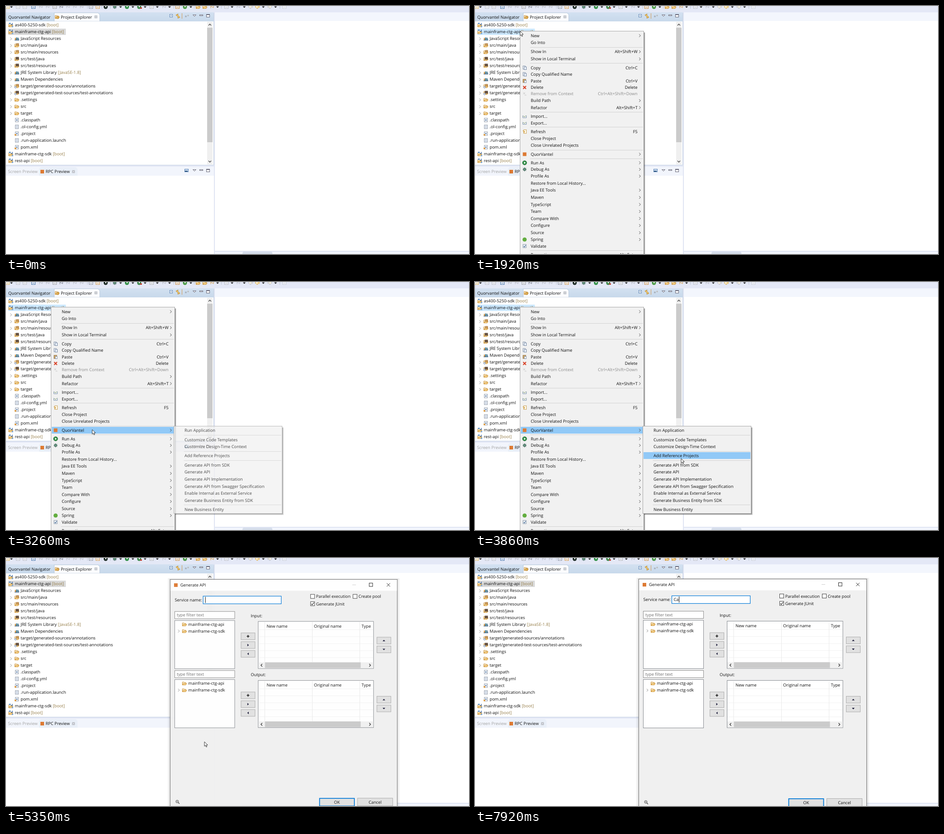
An HTML page with a canvas that plays this animation: 1022x548 px, repeating every 8 s.

```html
<!DOCTYPE html>
<html lang="en">
<head>
<meta charset="utf-8">
<title>Generate API</title>
<style>
html, body { margin: 0; width: 100%; height: 100%; overflow: hidden; background: #fff; }
canvas { display: block; }
</style>
</head>
<body>
<canvas id="stage" width="1022" height="548"></canvas>
<script>
const ctx = document.getElementById('stage').getContext('2d');
const LOOP = 8000;
const FONT = '9.3px "Open Sans", "Noto Sans", sans-serif';
const BLUE = '#0078d7', HILITE = '#91c9f7', ORANGE = '#dd7a33';

// ---- primitives ----
function rect(x, y, w, h, fill, stroke, lw = 1) {
  if (fill) { ctx.fillStyle = fill; ctx.fillRect(x, y, w, h); }
  if (stroke) { ctx.strokeStyle = stroke; ctx.lineWidth = lw; ctx.strokeRect(x, y, w, h); }
}
function poly(pts, fill, stroke, lw = 1, close = true) {
  ctx.beginPath();
  for (let i = 0; i < pts.length; i += 2) ctx.lineTo(pts[i], pts[i + 1]);
  if (close) ctx.closePath();
  if (fill) { ctx.fillStyle = fill; ctx.fill(); }
  if (stroke) { ctx.strokeStyle = stroke; ctx.lineWidth = lw; ctx.stroke(); }
}
const line = (pts, color, lw = 1) => poly(pts, null, color, lw, false);
function disc(x, y, r, fill, stroke, lw = 1) {
  ctx.beginPath();
  ctx.arc(x, y, r, 0, 7);
  if (fill) { ctx.fillStyle = fill; ctx.fill(); }
  if (stroke) { ctx.strokeStyle = stroke; ctx.lineWidth = lw; ctx.stroke(); }
}
function text(s, x, y, color = '#111', align = 'left') {
  ctx.fillStyle = color;
  ctx.textAlign = align;
  ctx.fillText(s, x, y + 3.1);
}
function chevron(x, y, dx, dy, color = '#555', lw = 1) {
  const s = 3;
  if (dx) line([x - dx * 1.5, y - s, x + dx * 1.5, y, x - dx * 1.5, y + s], color, lw);
  else line([x - s, y - dy * 1.5, x, y + dy * 1.5, x + s, y - dy * 1.5], color, lw);
}
const cross = (x, y, r, color, lw) => {
  line([x - r, y - r, x + r, y + r], color, lw);
  line([x - r, y + r, x + r, y - r], color, lw);
};
const caret = (x, y, color = '#111') => poly([x - 3, y, x + 3, y, x, y + 3], color);

// ---- icons, centred on x, y ----
const icon = {
  folder(x, y) {
    poly([x - 4.5, y + 3.5, x - 4.5, y - 3, x - 1, y - 3, x, y - 2, x + 3, y - 2, x + 3, y], '#fdf0cf', '#c98f35');
    poly([x - 4.5, y + 3.5, x - 2.5, y, x + 5, y, x + 3, y + 3.5], '#f8d58c', '#c98f35');
  },
  pkg(x, y) {
    icon.folder(x, y);
    rect(x - 1, y - 4, 5, 4, '#d9a763', '#8c5a25', .8);
  },
  test(x, y) {
    icon.folder(x, y);
    rect(x - 2, y - 4, 6, 5, '#6b5444', '#463528', .8);
  },
  gen(x, y) { icon.pkg(x, y); disc(x - 3, y + 2.5, 2, '#e8eef8', '#5877a8', .8); },
  genTest(x, y) { icon.test(x, y); disc(x - 3, y + 2.5, 2, '#e8eef8', '#5877a8', .8); },
  lib(x, y) {
    rect(x - 4.5, y - 1.5, 3, 5, '#d29a4c');
    rect(x - 1.5, y - 2.5, 2, 6, '#2f6f9f');
    rect(x + .8, y - 2, 1.6, 5.5, '#4f8a78');
    poly([x + 2.4, y - 2, x + 3.6, y - 2, x + 5.2, y + 3.5, x + 3.4, y + 3.5], '#3a6496');
    line([x - 5, y + 3.5, x + 5, y + 3.5], '#274d77');
  },
  boot(x, y) {
    icon.folder(x - .5, y + .5);
    line([x + 3, y - 4.5, x + 3, y - 1, x + .5, y - .5], '#2b62ad', 1.3);
    rect(x - 4.5, y - 5, 4, 3, '#6b9bd0');
    rect(x + 2, y + 2, 3, 3, '#7aa7d8');
  },
  file(x, y) {
    rect(x - 3.5, y - 4, 7, 8, '#fff', '#8c97a8');
    for (let i = -2; i < 4; i += 2) line([x - 2, y + i, x + 2, y + i], '#8aa0c0', .8);
  },
  xml(x, y) { rect(x - 3.5, y - 4, 7, 8, '#fff', '#8c97a8'); cross(x, y, 1.7, '#2d5b94', 1); },
  xmlTag(x, y) { icon.xml(x, y); rect(x - 5, y + 1, 3.5, 3.5, '#e09a3c'); },
  brand(x, y) { rect(x - 4, y - 4, 8, 8, ORANGE); },
  copy(x, y) {
    rect(x - 3.5, y - 4, 5, 7, '#fff', '#7b8ca5');
    rect(x - 1, y - 2, 5, 6, '#e9f0fa', '#7b8ca5');
  },
  paste(x, y) { rect(x - 3.5, y - 3.5, 6, 7, '#d5ad6b', '#8f6b35'); rect(x - .5, y - 1, 4, 5, '#fff', '#7b8ca5'); },
  del(x, y) { cross(x, y, 3.2, '#d9452b', 2.2); },
  remove(x, y) { cross(x - 1, y - 1, 2, '#c3c3c3', 1); line([x, y + 3, x + 4, y + 3], '#c3c3c3'); },
  port(x, y) { line([x - 4, y - 2, x - 4, y + 3, x + 4, y + 3, x + 4, y - 2], '#7b93ae'); line([x - 3, y - 1, x, y + 1, x + 3, y - 2], '#6f9160'); },
  refresh(x, y) { rect(x - 2, y - 4, 6, 8, '#fff8e8', '#c9a460'); line([x - 4, y - 2, x, y, x - 2, y + 3], '#d2992f', 1.3); },
  run(x, y) { disc(x, y, 4.6, '#2f8f45', '#1c6b30'); poly([x - 1.3, y - 2.4, x + 2.6, y, x - 1.3, y + 2.4], '#fff'); },
  bug(x, y) {
    cross(x, y, 3.3, '#31594e', 1);
    line([x - 4.5, y, x + 4.5, y], '#31594e');
    line([x, y - 4.5, x, y + 4.5], '#31594e');
    disc(x, y, 2.6, '#6f9f86', '#31594e');
  },
  spring(x, y) { disc(x, y, 4.6, '#62ad3f'); },
  check(x, y) { rect(x - 3.5, y - 3.5, 7, 7, '#fff', '#7c8ea4'); line([x - 2, y, x - .5, y + 2, x + 2.5, y - 2], '#2a5688', 1.2); }
};

// ---- workbench ----
const TREE = [
  ['as400-5250-sdk', 'boot', '[boot]'], ['mainframe-ctg-api', 'boot', '[boot]'],
  ['JavaScript Resources', 'lib'], ['src/main/java', 'pkg'], ['src/main/resources', 'pkg'],
  ['src/test/java', 'test'], ['src/test/resources', 'test'],
  ['JRE System Library', 'lib', '[JavaSE-1.8]'], ['Maven Dependencies', 'lib'],
  ['target/generated-sources/annotations', 'gen'],
  ['target/generated-test-sources/test-annotations', 'genTest'],
  ['.settings', 'folder'], ['src', 'folder'], ['target', 'folder'],
  ['.classpath', 'xml'], ['.ol-config.yml', 'file'], ['.project', 'xmlTag'],
  ['.run-application.launch', 'file'], ['pom.xml', 'xmlTag'],
  ['mainframe-ctg-sdk', 'boot', '[boot]'], ['rest-api', 'boot', '[boot]']
];
const GRAY = '#b9bcc6';
const TOOLS = {
  square: [[3, '#e3bc62'], [26, GRAY], [41, GRAY], [60, '#3c6ea8'], [107, '#9a9ca3'], [187, '#8a93a5'],
    [202, '#d59a4a'], [321, '#b0b2b8'], [378, '#c7893b'], [486, GRAY], [614, '#c9ced9']],
  disc: [[220, '#1d2b25'], [267, '#2f8f45'], [294, '#3f8a4d'], [395, '#4a9a45']],
  slash: [[77, GRAY], [92, GRAY], [122, '#777b86'], [137, GRAY], [152, GRAY], [167, GRAY], [349, GRAY], [455, '#d9a04a'], [513, GRAY]],
  arrow: [[540, GRAY, -1], [555, '#e0a92e', -1], [582, GRAY, 1]],
  caret: [12, 253, 280, 307, 334, 361, 408, 467, 499, 526, 568, 595],
  rule: [179, 211, 230, 370, 415, 475, 604]
};

function toolbar() {
  rect(0, 0, 1022, 14, '#e4e8f6');
  for (const [x, c] of TOOLS.square) { rect(x - 3.5, -4.5, 8, 10, '#f3f5fa', c); line([x - 2, 2.5, x + 3, 2.5], c); }
  for (const [x, c] of TOOLS.disc) { disc(x, 2, 4.5, c); rect(x - 1, 0, 2.5, 2.5, '#fff'); }
  for (const [x, c] of TOOLS.slash) line([x - 3, 5, x - 3, 0, x + 3, 4, x + 3, -1], c);
  for (const [x, c, d] of TOOLS.arrow) poly([x + 5 * d, 2, x, -2, x, .5, x - 4 * d, .5, x - 4 * d, 3.5, x, 3.5, x, 6], '#fff8e4', c);
  for (const x of TOOLS.caret) caret(x, 1);
  for (const x of TOOLS.rule) line([x + .5, 0, x + .5, 6], '#c3c8d6');
  icon.bug(240, 2);
  rect(296, 3, 4, 3, '#c0392b');
  icon.folder(424, 2);
  icon.folder(439, 2);
}

function viewButtons(y) {
  poly([412.5, y - 2.5, 419.5, y - 2.5, 416, y + 1], '#fff', '#667');
  rect(427.5, y - 2.5, 7, 2, '#fff', '#667');
  rect(442.5, y - 3.5, 7, 6, '#fff', '#667');
  line([442.5, y - 2.5, 449.5, y - 2.5], '#667');
}
function tabClose(x, y) {
  cross(x, y, 2.6, '#7c828e', 2.6);
  cross(x, y, 2.6, '#fff', 1.1);
}

function explorer(hot) {
  const g = ctx.createLinearGradient(0, 14, 0, 33);
  g.addColorStop(0, '#d3e1f1');
  g.addColorStop(1, '#c8d9eb');
  rect(0, 14, 459, 20, g);
  poly([106.5, 34, 106.5, 15, 203, 15, 207, 19, 207, 34], '#fbfcfe', '#b6c7da');
  rect(0, 34, 459, 317, '#fff');
  line([458.5, 16, 458.5, 351.5, 0, 351.5], '#c3d1e2');
  text('Quorvantel Navigator', 5, 24.5);
  icon.folder(113, 24);
  rect(112, 23, 4, 5, '#e9b65b', '#a97728', .8);
  text('Project Explorer', 121, 24.5);
  tabClose(198.5, 24);
  rect(361.5, 18.5, 6, 6, '#fff', '#5c83b5');
  line([363, 21.5, 366, 21.5], '#35608f');
  poly([375, 20, 380, 17.5, 379, 20, 384, 25, 379, 27, 380, 24], '#f3cf78', '#bd8424');
  line([388.5, 16, 388.5, 28], '#d39a55');
  disc(397, 23, 2, '#a9b3bf');
  disc(402, 21, 1.8, '#bbb');
  viewButtons(22);

  rect(5, 50, 127, 14, hot ? '#cce8ff' : '#d9d9d9');
  TREE.forEach(([label, kind, note], i) => {
    const y = 42 + 15 * i, root = kind === 'boot', x = root ? 19.5 : 32.3;
    icon[kind](root ? 11 : 24, y);
    if (!root && i < 14) chevron(11, y + .5, 1, 0, '#8a8a8a');
    text(label, x, y);
    if (note) text(note, x + ctx.measureText(label + ' ').width, y, '#957d47');
  });

  rect(444, 35, 12, 315, '#f0f0f0');
  rect(444, 48, 12, 253, '#cbcbcb');
  chevron(450, 41.5, 0, -1, '#444', 1.3);
  chevron(450, 343.5, 0, 1, '#444', 1.3);
}

function workbench(hot) {
  rect(0, 0, 1022, 548, '#fff');
  toolbar();
  explorer(hot);
  rect(0, 352, 460, 4, '#e4e8f6');
  rect(0, 355, 459, 20, '#f2f5fc');
  poly([73, 375, 73, 360, 77, 356, 154, 356, 158, 360, 158, 375], '#e9eff8');
  text('Screen Preview', 4.5, 366, '#a3a3a3');
  icon.brand(80, 366);
  text('RPC Preview', 87.5, 366);
  tabClose(149, 366);
  rect(394.5, 360.5, 8, 6, '#cfe0f2', '#5c83b5');
  rect(395, 364, 6, 2, '#33587f');
  viewButtons(364);

  rect(459, 14, 2, 534, '#dfe4f3');
  rect(461, 14, 561, 19, '#f3f6fd');
  rect(461, 541, 561, 2, '#dfe4f3');
  rect(461, 543, 561, 5, '#f3f6fd');
  poly([522, 548, 522, 545, 524, 543, 586, 543, 588, 545, 588, 548], '#d6deeb');
}

// ---- menus: [y, label, shortcut or '>', icon] ----
const MENU = [
  [65.5, 'New', '>'], [81, 'Go Into'], [101, 'Show In', 'Alt+Shift+W>'], [117, 'Show in Local Terminal', '>'],
  [136.5, 'Copy', 'Ctrl+C', 'copy'], [151, 'Copy Qualified Name', '', 'copy'], [165.5, 'Paste', 'Ctrl+V', 'paste'],
  [180, 'Delete', 'Delete', 'del'], [194, 'Remove from Context', 'Ctrl+Alt+Shift+Down', 'remove'],
  [209, 'Build Path', '>'], [224.5, 'Refactor', 'Alt+Shift+T>'], [244, 'Import...', '', 'port'],
  [258.5, 'Export...', '', 'port'], [277.5, 'Refresh', 'F5', 'refresh'], [292.5, 'Close Project'],
  [308, 'Close Unrelated Projects'], [327.5, 'QuorVantel', '>', 'brand'], [346.5, 'Run As', '>', 'run'],
  [361, 'Debug As', '>', 'bug'], [376, 'Profile As', '>'], [391.5, 'Restore from Local History...'],
  [407, 'Java EE Tools', '>'], [423, 'Maven', '>'], [438.5, 'TypeScript', '>'], [454, 'Team', '>'],
  [469.5, 'Compare With', '>'], [485, 'Configure', '>'], [501, 'Source', '>'], [516, 'Spring', '>', 'spring'],
  [530.5, 'Validate', '', 'check'], [550, 'Properties', 'Alt+Enter']
];
const MENU_RULES = [91, 126.5, 234.5, 267.5, 318, 337, 540];
const SUBMENU = [
  [328, 'Run Application'], [348.5, 'Customize Code Templates'], [364, 'Customize Design-Time Context'],
  [384, 'Add Reference Projects'], [404.4, 'Generate API from SDK'], [420, 'Generate API'],
  [435.5, 'Generate API Implementation'], [451.5, 'Generate API from Swagger Specification'],
  [467, 'Enable Internal as External Service'], [482.5, 'Generate Business Entity from SDK'],
  [503, 'New Business Entity']
];
const SUB_RULES = [338, 374, 394.5, 492.5];
const VENDOR_Y = 327.5;

// Only the visible right and bottom edges, so a fading menu stays clean.
function shadow(x, y, w, h) {
  [.45, .28, .12].forEach((a, i) => {
    const d = i + 1;
    line([x + w + d, y + 3, x + w + d, y + h + d, x + 3, y + h + d], `rgba(0,0,0,${a})`);
  });
}
const bar = (x, row, w) => rect(x, Math.round(row - 8), w, 15, HILITE);

function menu(x, y, w, h, items, rules, hot) {
  shadow(x, y, w, h);
  rect(x, y, w, h, '#f1f1f1', '#a6a6a6');
  for (const r of rules) line([x + 22, Math.floor(r) + .5, x + w - 2, Math.floor(r) + .5], '#d2d2d2');
  for (const [row, label, key = '', pic] of items) {
    if (row === hot) bar(x + 1.5, row, w - 3);
    const color = pic === 'remove' ? '#8b8b8b' : '#111';
    if (pic) icon[pic](x + 10, row);
    text(label, x + 23.4, row, color);
    text(key.replace('>', ''), x + 259.3, row, color, 'right');
    if (key.endsWith('>')) chevron(x + 264.3, row, 1, 0, '#444');
  }
}
function rowAt(items, y) {
  const row = items.find(([r]) => Math.abs(y + 1 - r) < 7.6);
  return row && row[0];
}

// ---- dialog ----
function checkbox(x, y, label, on) {
  rect(x - 4.5, y - 4.5, 9, 9, '#fff', '#444');
  if (on) line([x - 3, y, x - 1, y + 2.5, x + 3.2, y - 2.6], '#222', 1.2);
  text(label, x + 7.7, y + .4);
}
function button(x, y, w, h) { rect(x, y, w, h, '#e1e1e1', '#adadad'); }

function picker(dy, name, mouse) {
  const over = mouse.x > 371 && mouse.x < 505 && Math.abs(mouse.y - 125.5 - dy) < 8.5;
  rect(371.5, 117.5 + dy, 133, 16, '#fff', over ? '#222' : '#8a8a8a');
  text('type filter text', 376, 125.7 + dy, '#6d6d6d');
  rect(371.5, 137.5 + dy, 133, 107, '#fff', '#85898f');
  ['mainframe-ctg-api', 'mainframe-ctg-sdk'].forEach((s, i) => {
    const y = 146 + 15 * i + dy;
    icon.folder(393, y);
    text(s, 401.5, y);
    if (i) chevron(380.5, y, 1, 0, '#8a8a8a');
  });

  text(name, 540, 127 + dy);
  for (let i = 0; i < 3; i++) {
    const y = 172.5 + 19.5 * i + dy;
    button(518.5, y - 7.5, 31, 15);
    if (i === 0) { line([531, y, 537, y], '#111', 1.5); line([534, y - 3, 534, y + 3], '#111', 1.5); }
    else { const d = i === 1 ? 1 : -1; poly([534 - d * 1.5, y - 2.8, 534 + d * 1.8, y, 534 - d * 1.5, y + 2.8], '#1c1c3a'); }
  }
  for (const d of [-1, 1]) {
    const y = 191.8 + 9.8 * d + dy;
    button(819.5, y - 7.5, 31, 15);
    poly([832, y - d * 1.5, 838, y - d * 1.5, 835, y + d * 1.8], '#1c1c3a');
  }

  rect(556.5, 139.5 + dy, 255.5, 104.5, '#fff', '#85898f');
  for (let i = 0; i < 5; i++) line([557, 158 + 15.5 * i + dy, 811, 158 + 15.5 * i + dy], '#f1f1f1');
  for (const x of [571, 676.5, 781.5]) line([x, 141 + dy, x, 230 + dy], '#e9e9e9');
  text('New name', 575, 150 + dy);
  text('Original name', 680, 150 + dy);
  text('Type', 785.5, 150 + dy);
  rect(557, 230.3 + dy, 254.5, 13, '#f0f0f0');
  rect(571.5, 230.3 + dy, 212, 12.5, '#cbcbcb');
  chevron(564, 236.7 + dy, -1, 0, '#333', 1.3);
  chevron(804, 236.7 + dy, 1, 0, '#333', 1.3);
}

function dialog(typed, caretOn, mouse) {
  for (let i = 1; i < 7; i++) rect(361.5 - i, 47 - i / 2, 503 + 2 * i, 520, null, `rgba(0,0,0,${.13 - i * .02})`);
  rect(361.5, 46.5, 503, 510, '#f0f0f0', '#6f6f6f');
  rect(362, 47, 502, 24.5, '#fff');
  icon.brand(374, 59);
  text('Generate API', 384, 59);
  line([765, 58.5, 773, 58.5], '#ccc');
  rect(802.5, 54.5, 7.5, 7.5, null, '#222');
  cross(845, 58.5, 3.7, '#222', 1);

  text('Service name:', 371.5, 92);
  rect(434.5, 83.5, 173, 17, '#fff', BLUE, 1.2);
  text(typed, 438.5, 92);
  if (caretOn) rect(439 + ctx.measureText(typed).width, 85, 1, 13.5, '#000');
  checkbox(677, 84, 'Parallel execution');
  checkbox(771, 84, 'Create pool');
  checkbox(677, 100.3, 'Generate JUnit', true);
  picker(0, 'Input:', mouse);
  picker(131, 'Output:', mouse);

  disc(377, 539, 3, '#fff', '#444');
  line([379, 541, 382, 544], '#444', 1.4);
  line([375.5, 539, 378.5, 539], '#444', .8);
  line([377, 537.5, 377, 540.5], '#444', .8);
  rect(692.5, 532, 77, 17, '#e1e1e1', BLUE, 1.8);
  text('OK', 731, 540.5, '#111', 'center');
  button(776.5, 531.5, 78, 17);
  text('Cancel', 815.5, 540.5, '#111', 'center');
}

// ---- pointer: [start, end, steps, x, y] ----
const MOVES = [
  [210, 350, 3, 264, 264], [590, 1060, 7, 99.5, 55.5], [2140, 2550, 6, 174, 318.5],
  [2780, 3000, 4, 181, 327.5], [3150, 3330, 3, 191, 326], [3470, 3860, 6, 455, 390],
  [4100, 4400, 4, 455, 402], [5190, 5350, 3, 438, 406], [5420, 5670, 4, 440, 253],
  [5890, 6230, 5, 462, 92]
];
function pointerAt(t) {
  let x = 1867, y = 968;
  for (const [t0, t1, n, toX, toY] of MOVES) {
    if (t < t0) break;
    const step = Math.floor((t - t0) / (t1 - t0) * (n - 1) + .1) + 1;
    const e = 1 - (1 - Math.min(1, step / n)) ** 2.4;
    x += (toX - x) * e;
    y += (toY - y) * e;
  }
  return { x, y };
}
function pointer({ x, y }, beam) {
  if (beam) {
    line([x - 2, y - 6, x + 2, y - 6], '#222');
    line([x, y - 6, x, y + 6], '#222');
    line([x - 2, y + 6, x + 2, y + 6], '#222');
    return;
  }
  poly([x, y, x, y + 10, x + 2.3, y + 8, x + 4, y + 11.7, x + 5.6, y + 11, x + 4, y + 7.4, x + 7.2, y + 7.2], '#fff', '#222', .9);
}

const fadeIn = (t, t0) => t < t0 ? 0 : Math.min(1, .35 + .4 * Math.floor((t - t0) / 85 + .1));
function faded(alpha, draw) {
  if (alpha <= 0) return;
  ctx.save();
  ctx.globalAlpha = alpha;
  draw();
  ctx.restore();
}

function draw(t) {
  const mouse = pointerAt(t);
  ctx.font = FONT;
  ctx.textRendering = 'geometricPrecision';
  workbench(t >= 980 && t < 5190);

  if (t < 5040) {
    const hot = t >= 2780 ? VENDOR_Y : t >= 2140 ? rowAt(MENU, mouse.y) : null;
    faded(fadeIn(t, 1750), () => menu(99.5, 55.5, 273, 520, MENU, MENU_RULES, hot));
    const subHot = mouse.x > 372 ? rowAt(SUBMENU, mouse.y) : null;
    faded(fadeIn(t, 3150), () => menu(370.5, 318.5, 239, 193, SUBMENU, SUB_RULES, subHot));
  } else if (t < 5190) {
    faded(t < 5120 ? .7 : .35, () => {
      bar(372, 404.4, 236.5);
      text('Generate API from SDK', 393.9, 404.4);
    });
  }

  if (t >= 5190) {
    const p = Math.min(1, Math.floor((t - 5190) / 78 + .1) / 3);
    const rest = (1 - p) ** 3, scale = 1 - .1 * rest;
    const typed = t < 7070 ? '' : t < 7920 ? 'C' : 'Ca';
    const caretOn = t < 5890 || (t >= 6370 && t < 6840) || (t >= 7070 && t < 7630) || t >= 7920;
    faded(1 - rest, () => {
      ctx.translate(613, 300);
      ctx.scale(scale, scale);
      ctx.translate(-613, -300);
      dialog(typed, caretOn, t < 7070 ? mouse : { x: 0, y: 0 });
    });
  }
  const overFilter = mouse.x < 505 && (Math.abs(mouse.y - 256) < 8 || Math.abs(mouse.y - 125.5) < 8);
  if (t < 7070) pointer(mouse, t >= 5600 && (overFilter || mouse.y < 101));
}

const start = performance.now();
(function tick() {
  draw((performance.now() - start) % LOOP);
  requestAnimationFrame(tick);
})();
</script>
</body>
</html>
```
